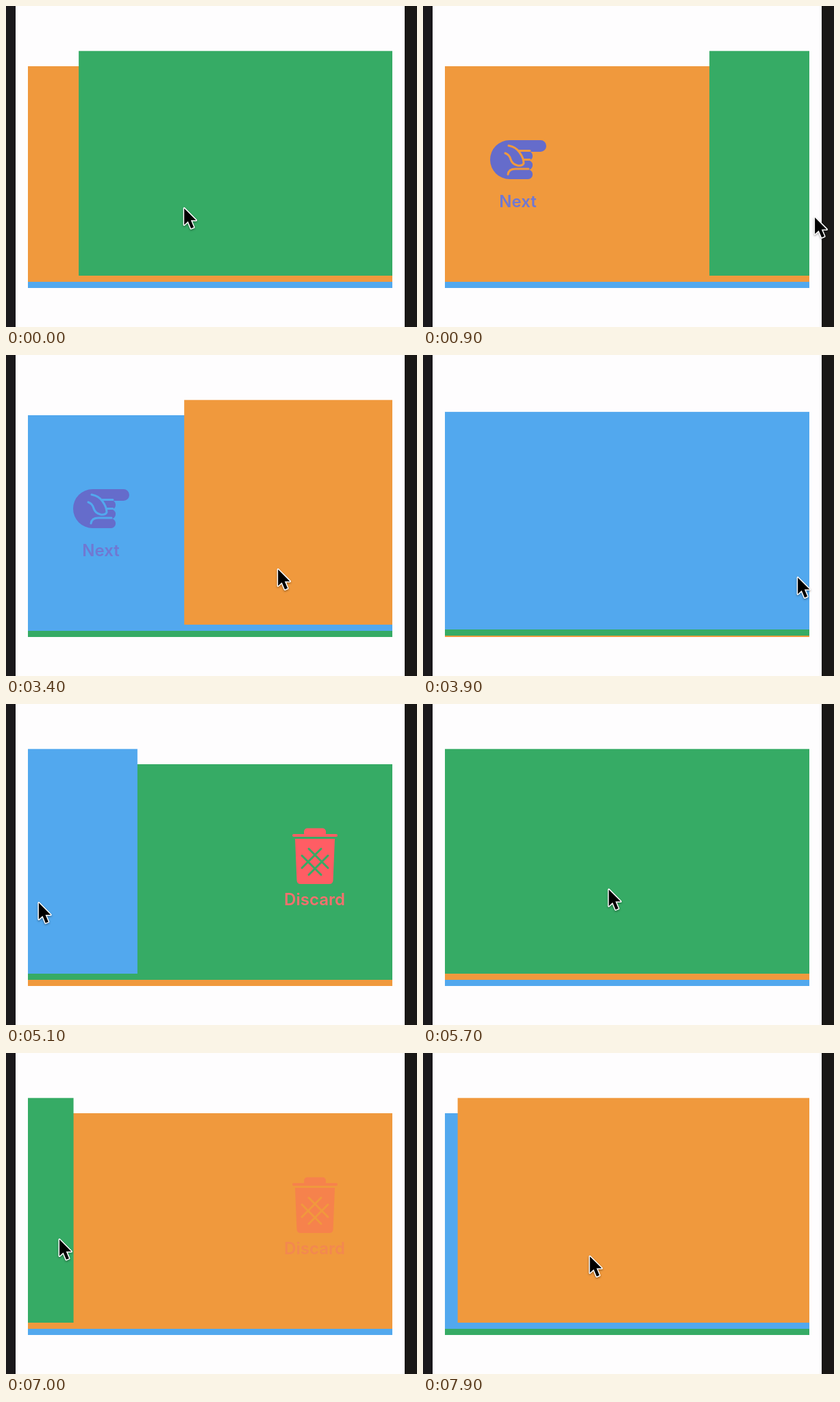
An HTML page with a canvas that plays this animation: 600x469 px, repeating every 8000 ms.

```html
<!DOCTYPE html>
<html lang="en">
<head>
<meta charset="utf-8">
<title>Swipe cards</title>
<style>
html, body { margin: 0; width: 100%; height: 100%; overflow: hidden; background: #fefdfe; }
canvas { display: block; }
</style>
</head>
<body>
<canvas id="stage" width="600" height="469"></canvas>
<script>
const ctx = document.getElementById('stage').getContext('2d');
const LOOP = 8000, STEP = 100;
const FLIGHT = 180, SETTLE = 330, GLIDE = 700;
const LEFT = 32, WIDTH = 532;
const COLORS = ['#36ab65', '#f0993d', '#52a8ee'];

// The pointer drags between two points, then glides to the next swipe by the time "ready"
const SWIPES = [
  { start: -400, end: 1050, from: [185, 291], to: [583, 308], release: 1070, ready: 2050 },
  { start: 2500, end: 3980, from: [98, 288], to: [550, 324], release: 3620, ready: 4250, grab: 168 },
  { start: 4600, end: 5150, from: [419, 294], to: [38, 289], release: 5195, ready: 6000 },
  { start: 6100, end: 6900, from: [421, 282], to: [60, 274], release: 6890, ready: 7400 },
  { start: 7550, end: 10000, from: [224, 295], to: [560, 308], release: 10000, ready: 11000 }
];

const clamp = v => Math.max(0, Math.min(1, v));
const mix = (a, b, p) => a + (b - a) * p;
const ease = (t, from, to) => {
  const p = clamp((t - from) / (to - from));
  return p * p * (3 - 2 * p);
};

function pointerAt(t) {
  const n = SWIPES.findIndex(s => t < s.ready);
  const { start, end, from, to, ready } = SWIPES[n];
  const leave = Math.max(end, ready - GLIDE);
  if (t < leave) {
    const p = ease(t, start, end);
    return [mix(from[0], to[0], p), mix(from[1], to[1], p)];
  }
  const p = ease(t, leave, ready), next = SWIPES[n + 1].from;
  return [mix(to[0], next[0], p), mix(to[1], next[1], p) - 16 * Math.sin(Math.PI * p)];
}

function card(color, depth, shift = 0) {
  const top = 65.7 + 22.3 * Math.min(1, depth);
  ctx.fillStyle = color;
  ctx.fillRect(LEFT + shift, top, WIDTH, 394 + 9 * depth - top);
}

const hand = new Path2D();
hand.roundRect(98, 196, 52, 57, [28.5, 0, 0, 28.5]);
hand.roundRect(120, 196, 60, 17, 8.5);
for (let i = 0; i < 3; i++) hand.roundRect(125, 212 + 13.5 * i, 35, 14, 6.5);
const handLines = new Path2D('M125 204Q136 206 141 214Q147 222 147 230Q145 234 138 233' +
  'Q130 231 128 224Q126 217 120 215M140 211.5H156M147 224.5H156M154 238H135Q125 238 124 246');

const bin = new Path2D('M422 197H480L477.5 258Q477 263 472 263H430Q425 263 424.5 258Z');
bin.roundRect(418, 190, 66, 4, 2);
bin.roundRect(435, 181.5, 32, 12, 5);
const binLines = new Path2D();
for (const d of [-5, 5]) {
  for (const side of [-1, 1]) {
    const x = 451 + d, y = 230.5 - side * d;
    binLines.moveTo(x - 14 * side, y - 14);
    binLines.lineTo(x + 14 * side, y + 14);
  }
}

const NEXT = { label: 'Next', x: 138.5, shape: hand, lines: handLines, fill: '#656ccb', text: '#7078d2' };
const DISCARD = { label: 'Discard', x: 450.5, shape: bin, lines: binLines, fill: '#ff5d64', text: '#f6706e' };

function drawAction(action, background, alpha) {
  ctx.globalAlpha = alpha;
  ctx.fillStyle = action.fill;
  ctx.fill(action.shape);
  ctx.fillStyle = action.text;
  ctx.font = '600 24px Inter, sans-serif';
  ctx.textAlign = 'center';
  ctx.fillText(action.label, action.x, 293.5);
  ctx.globalAlpha = 1;
  ctx.strokeStyle = background;
  ctx.lineWidth = 3;
  ctx.lineCap = 'round';
  ctx.stroke(action.lines);
}

const arrow = new Path2D('M1 1.5V25.5L6.6 20.4L10.9 30.8L15 29.1L10.7 18.9H18.3Z');

function drawPointer(x, y) {
  ctx.save();
  ctx.translate(x, y);
  ctx.shadowColor = 'rgba(0,0,0,.35)';
  ctx.shadowBlur = 3;
  ctx.shadowOffsetY = 1.5;
  ctx.strokeStyle = '#fff';
  ctx.lineWidth = 3;
  ctx.lineJoin = 'round';
  ctx.stroke(arrow);
  ctx.shadowColor = 'transparent';
  ctx.fillStyle = '#000';
  ctx.fill(arrow);
  ctx.restore();
}

function drawStack(t) {
  const n = SWIPES.findIndex(s => t < s.release + FLIGHT + SETTLE);
  const { start, release, from, to, grab = from[0] } = SWIPES[n];
  const [top, second, third] = [0, 1, 2].map(i => COLORS[(n + i) % 3]);
  const gone = release + FLIGHT;

  if (t >= gone) {
    const p = ease(t, gone, gone + SETTLE);
    card(top, 2);
    card(third, 2 - p);
    card(second, 1 - p);
    return;
  }
  const dir = Math.sign(to[0] - from[0]);
  const pull = t < start ? 0 : Math.max(0, dir * (pointerAt(Math.min(t, release))[0] - grab));
  const flight = clamp((t - release) / FLIGHT);
  const alpha = clamp((pull - 80) / 120) * (1 - flight);
  card(third, 2);
  card(second, 1);
  if (alpha > 0) drawAction(dir > 0 ? NEXT : DISCARD, second, alpha);
  card(top, 0, dir * mix(pull, WIDTH, flight));
}

function draw(t) {
  ctx.fillStyle = '#fefdfe';
  ctx.fillRect(0, 0, 600, 469);

  ctx.save();
  ctx.beginPath();
  ctx.rect(LEFT, 0, WIDTH, 469);
  ctx.clip();
  drawStack(t);
  ctx.restore();

  ctx.fillStyle = '#1a181b';
  ctx.fillRect(0, 0, 14, 469);
  ctx.fillStyle = '#191715';
  ctx.fillRect(582, 0, 18, 469);
  drawPointer(...pointerAt(t));
}

const begin = performance.now();
function tick() {
  const t = (performance.now() - begin) % LOOP;
  draw(Math.floor(t / STEP) * STEP);
  requestAnimationFrame(tick);
}
tick();
</script>
</body>
</html>
```
